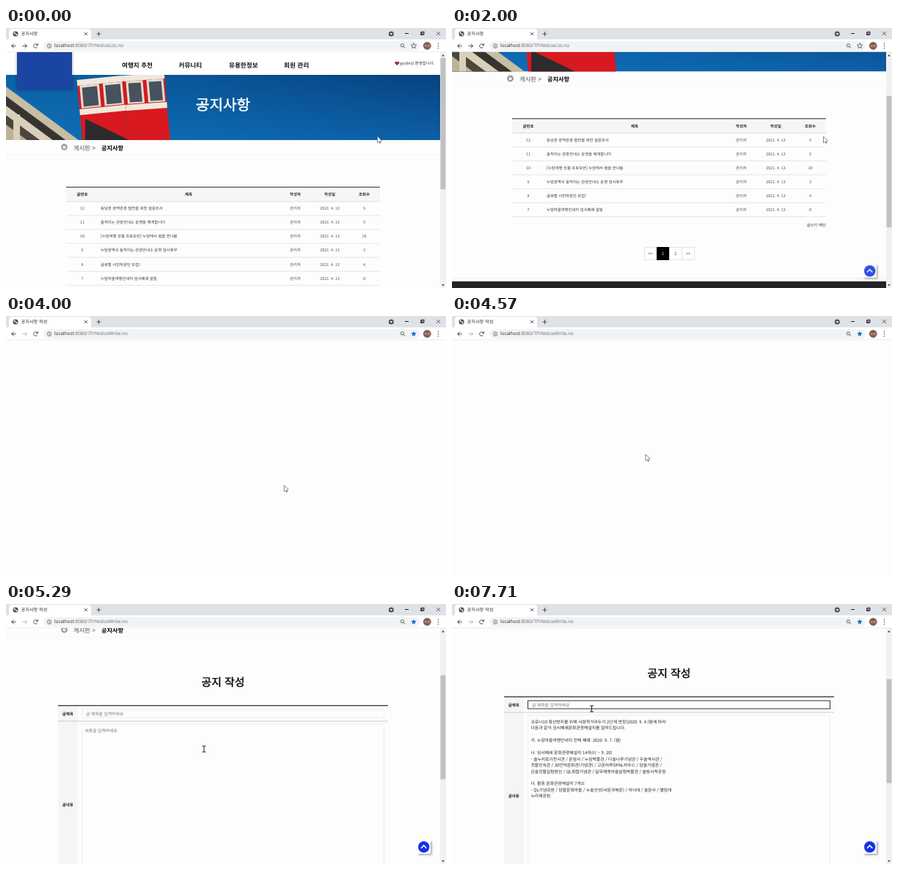
An HTML page with a canvas that plays this animation: 600x355 px, repeating every 8 s.

```html
<!DOCTYPE html>
<html lang="ko">
<head>
<meta charset="utf-8">
<title>공지사항</title>
<style>
html, body { margin: 0; width: 600px; height: 355px; overflow: hidden; background: #fdfdfd; }
canvas { display: block; }
</style>
</head>
<body>
<canvas id="stage" width="600" height="355"></canvas>
<script>
const ctx = document.getElementById('stage').getContext('2d');
const LOOP = 8000, FPS = 7, VIEW_TOP = 33, VIEW_H = 322;
const KR = '"Noto Sans CJK KR", "Noto Sans CJK", "Noto Sans", sans-serif';
const UI = '"Open Sans", "Noto Sans", sans-serif';
const INK = '#4d5156';

// ---------- helpers ----------
function rect(x, y, w, h, fill) { ctx.fillStyle = fill; ctx.fillRect(x, y, w, h); }
function box(x, y, w, h, color, width = 1) {
  ctx.strokeStyle = color; ctx.lineWidth = width;
  ctx.strokeRect(x + .5, y + .5, w - 1, h - 1);
}
function poly(points) {
  ctx.beginPath();
  for (let i = 0; i < points.length; i += 2) ctx.lineTo(points[i], points[i + 1]);
}
function shape(fill, ...points) { poly(points); ctx.closePath(); ctx.fillStyle = fill; ctx.fill(); }
function line(color, width, ...points) { poly(points); ctx.strokeStyle = color; ctx.lineWidth = width; ctx.stroke(); }
function disc(x, y, r, fill) { ctx.beginPath(); ctx.arc(x, y, r, 0, 7); ctx.fillStyle = fill; ctx.fill(); }
function ring(x, y, r, width, from = 0, to = 7) {
  ctx.beginPath(); ctx.arc(x, y, r, from, to);
  ctx.strokeStyle = INK; ctx.lineWidth = width; ctx.stroke();
}
function pill(x, y, w, h, r, fill) { ctx.beginPath(); ctx.roundRect(x, y, w, h, r); ctx.fillStyle = fill; ctx.fill(); }
function cross(x, y, r) { line(INK, .9, x - r, y - r, x + r, y + r); line(INK, .9, x + r, y - r, x - r, y + r); }
function chevron(x, y, r, color, width) { line(color, width, x - r, y + r / 2, x, y - r / 2, x + r, y + r / 2); }
function text(s, x, y, size, color = '#333', align = 'left', weight = 400, family = KR) {
  ctx.font = `${weight} ${size}px ${family}`;
  ctx.textRendering = 'geometricPrecision';
  ctx.textAlign = align; ctx.textBaseline = 'middle';
  ctx.fillStyle = color; ctx.fillText(s, x, y);
}
// Regular glyphs thickened a little, for medium-weight headings
function heading(s, x, y, size, color) {
  text(s, x, y, size, color, 'center');
  ctx.strokeStyle = color; ctx.lineWidth = size / 40; ctx.strokeText(s, x, y);
}
function scoped(fn) { ctx.save(); fn(); ctx.restore(); }
function shadow(blur, shift) { ctx.shadowColor = 'rgba(0,0,0,.4)'; ctx.shadowBlur = blur; ctx.shadowOffsetX = ctx.shadowOffsetY = shift; }
const clamp = v => Math.min(1, Math.max(0, v));
const ease = v => { v = clamp(v); return v * v * (3 - 2 * v); };

// ---------- browser frame ----------
function star(x, y, r, filled) {
  ctx.beginPath();
  for (let i = 0; i < 10; i++) {
    const a = (i / 5 - .5) * Math.PI, q = i % 2 ? r * .45 : r;
    ctx.lineTo(x + q * Math.cos(a), y + q * Math.sin(a));
  }
  ctx.closePath();
  ctx.fillStyle = '#1a67d2'; ctx.strokeStyle = INK; ctx.lineWidth = .8;
  filled ? ctx.fill() : ctx.stroke();
}
function arrow(x, dir, color) {
  line(color, 1, x - 3 * dir, 24.5, x + 3 * dir, 24.5);
  line(color, 1, x, 21.5, x + 3 * dir, 24.5, x, 27.5);
}
function chrome(writing) {
  rect(0, 0, 600, 16, '#dee1e6');
  pill(4, 1, 112, 20, 4, '#fff');
  rect(0, 15.5, 600, 17, '#fff');
  rect(0, 32.5, 600, .5, '#dcdee1');
  disc(13, 8, 3.6, INK);
  disc(11.8, 7, 1.2, '#dfe3e8'); disc(14.3, 9, 1.2, '#dfe3e8');
  text(writing ? '공지사항 작성' : '공지사항', 20.5, 8, 6.2, '#2c3034');
  cross(109, 8, 2);
  line(INK, 1, 123.5, 8, 129.5, 8); line(INK, 1, 126.5, 5, 126.5, 11);
  disc(525.3, 8, 3.5, INK);
  shape('#fff', 523.3, 7, 527.3, 7, 525.3, 9.4);
  line('#222', 1, 544, 7.5, 549, 7.5);
  box(566, 4.6, 4.6, 4.4, '#222', .8); box(565, 5.6, 4.6, 4.4, '#222', .8);
  cross(589.5, 7.5, 2.5);

  arrow(10.5, -1, INK);
  arrow(25.5, 1, writing ? '#b9bcc0' : INK);
  ring(40.3, 24.5, 2.7, 1, .5, 5.6);
  shape(INK, 43.8, 20.8, 43.8, 24, 40.6, 24);
  pill(51, 18, 513, 13, 6.5, '#f1f3f4');
  ring(59, 24.5, 2.8, .7);
  rect(58.6, 24, .9, 2.2, INK); rect(58.6, 22.6, .9, .8, INK);
  text('localhost', 66, 24.5, 6.4, '#202124', 'left', 400, UI);
  const w = ctx.measureText('localhost').width;
  text(`:8080/TP/Notice${writing ? 'Write' : 'List'}.no`, 66 + w, 24.5, 6.4, '#666a6f', 'left', 400, UI);
  ring(540.3, 23.7, 2.1, .9); line(INK, 1, 541.8, 25.2, 544.2, 27.6);
  star(556, 24.4, 3.9, writing);
  disc(574.3, 24.3, 5.4, '#8a5b50');
  text('누리', 574.3, 24.3, 4.2, '#f0e4e0', 'center');
  for (let i = -1; i < 2; i++) disc(589.5, 24.5 + i * 3, .8, INK);
}

// ---------- shared page parts ----------
function fade(x2, y2, from, to) {
  const g = ctx.createLinearGradient(0, 64, x2, y2);
  g.addColorStop(0, from); g.addColorStop(1, to);
  rect(0, 64, 592, 89, g);
}
// One leaning wall of the cable car: pale window band above a red body
function wall(x, y, w, slope, windows) {
  scoped(() => {
    ctx.transform(1, slope, .09, 1, x, y);
    rect(0, 0, w, 95, '#d8191f');
    rect(0, -4, w, 8, '#efe9dc');
    rect(0, 36, w, 8, '#efe9dc');
    const step = w / windows;
    for (let i = 0; i < windows; i++) {
      rect(i * step + 3, 4, step - 5, 31, '#e4ddd0');
      rect(i * step + 6, 7, step - 11, 26, '#46525c');
    }
  });
}
function hero() {
  scoped(() => {
    ctx.beginPath(); ctx.rect(0, 64, 592, 89); ctx.clip();
    fade(0, 153, '#07427f', '#0d5fa6');
    fade(592, 64, 'rgba(16,130,205,.5)', 'rgba(16,130,205,0)');
    ['#c8bda2', '#35342f', '#d9d0ba', '#4a463d', '#bdb298'].forEach((color, i) => {
      const y = 80 + i * 13;
      shape(color, 0, y, 160, y + 118, 0, y + 118);
    });
    rect(10, 118, 9, 35, '#d9d0ba');
    wall(97, 75, 63, -.1, 2);
    wall(160, 69, 56, -.07, 2);
    shape('#2d2b2c', 108, 124, 168, 153, 108, 153);
  });
  heading('공지사항', 296, 104.5, 20.2, '#fff');
}
function pageTop() {
  rect(0, 33, 592, 31, '#fff');
  Object.entries({ '여행지 추천': 158, '커뮤니티': 235.5, '유용한정보': 304, '회원 관리': 379 })
    .forEach(([s, x]) => text(s, x, 50.6, 8.6, '#111', 'left', 700));
  disc(531.9, 47.3, 1.6, '#8c3040'); disc(534.7, 47.3, 1.6, '#8c3040');
  shape('#8c3040', 530.4, 47.8, 536.2, 47.8, 533.3, 51.2);
  text('guide님 환영합니다.', 537, 48.3, 5.45, '#333');
  hero();
  scoped(() => { shadow(4, 0); rect(15, 33, 75, 51, '#1a45a2'); });
  disc(79.5, 162.5, 4.3, '#8f8f8f');
  rect(77.7, 162, 3.6, 2.8, '#fff');
  chevron(79.5, 161.2, 2.6, '#fff', 1);
  text('게시판 >', 92, 163.5, 8.3, '#8a8a8a', 'left', 700);
  text('공지사항', 130, 163.5, 8.2, '#000', 'left', 700);
  rect(0, 172, 592, 1, '#f5f5f5');
}
function scrollbar(scroll, pageHeight) {
  const rail = VIEW_H - 16, k = rail / pageHeight;
  rect(592, VIEW_TOP, 8, VIEW_H, '#f1f1f1');
  shape('#505050', 594, 38.5, 598, 38.5, 596, 36);
  shape('#505050', 594, 350, 598, 350, 596, 352.5);
  rect(592.5, 41 + scroll * k, 7, VIEW_H * k, '#c1c1c1');
}
function topButton(alpha) {
  if (!alpha) return;
  scoped(() => {
    ctx.globalAlpha = alpha;
    shadow(3, 1.5);
    rect(560, 322, 19, 19, '#fff');
    ctx.shadowColor = 'transparent';
    disc(569.7, 331.7, 7.7, '#1432e6');
    chevron(569.7, 331.6, 3.7, '#fff', 1.6);
  });
}

// ---------- notice list ----------
const NOTICES = {
  '동남권 광역관광 발전을 위한 설문조사': 9,
  '움직이는 관광안내소 운영을 재개합니다': 5,
  '[누담여행 상품 프로모션] 누담에서 쉼을 만나봄': 10,
  '누담광역시 움직이는 관광안내소 운영 임시휴무': 3,
  '글로벌 시민자문단 모집!': 4,
  '누담마을여행안내지 임시폐쇄 알림': 0
};
const COLUMNS = { '글번호': 104, '제목': 249, '작성자': 394.5, '작성일': 441.5, '조회수': 488.5 };
function listPage() {
  pageTop();
  rect(82, 217, 428, 20, '#f6f6f6');
  rect(82, 216.7, 428, 1.3, '#555');
  rect(82, 236.5, 428, 1, '#ddd');
  const cols = Object.values(COLUMNS);
  Object.keys(COLUMNS).forEach((s, i) => text(s, cols[i], 227.3, 5.4, '#222', 'center', 700));
  Object.entries(NOTICES).forEach(([title, views], i) => {
    const y = 246.3 + i * 19.05;
    [12 - i, '', '관리자', '2021. 4. 13', views].forEach((s, c) => text(s, cols[c], y, 5.4, '#555', 'center'));
    text(title, 129, y, 5.35, '#333');
    rect(82, y + 9.2, 428, 1, '#e6e6e6');
  });
  text('글쓰기 메인', 510, 362.6, 5.4, '#333', 'right');
  ['<<', '1', '2', '>>'].forEach((s, i) => {
    const x = 262 + i * 17.2, on = i === 1;
    rect(x, 392.6, 17.2, 18, on ? '#000' : '#fff');
    if (!on) box(x, 392.6, 17.2, 18, '#ddd', .8);
    text(s, x + 8.5, 401.8, 5.8, on ? '#fff' : '#444', 'center');
  });
  rect(0, 434.6, 592, 1, '#eee');
  rect(0, 439.6, 592, 40, '#222327');
}

// ---------- write form ----------
const BODY = `코로나19 확산방지를 위해 사회적거리두기 2단계 연장(2020. 9. 4.)됨에 따라
다음과 같이 임시폐쇄문화관광해설지를 알려드립니다.

가. 누담마을여행안내지 전체 폐쇄: 2020. 9. 7. (월)

나. 임시폐쇄 문화관광해설지 14개소( ~ 9. 20)
- 솔누리토기전시관 / 운담사 / 누담박물관 / 다솔나루기념관 / 두솔역사관 /
갯들민속관 / 30언덕문화관(기념관) / 고운마루OPAL하우스 / 담솔기념관 /
은솔강물길탐방선 / QL화합기념관 / 달무재옛마을살림박물관 / 솔빛사적공원

다. 활동 문화관광해설지 7개소
- QL기념공원 / 담들문화마을 / 누솔산성(서문과북문) / 하늬대 / 솔운사 / 별담대
누리재공원.`.split('\n');
function writePage(focus, filled) {
  pageTop();
  heading('공지 작성', 296, 234, 14.9, '#000');
  rect(71, 266, 27, 249, '#f5f5f5');
  rect(71, 265.5, 450, 1.4, '#444');
  for (const y of [287, 515]) rect(71, y, 450, 1, '#ccc');
  text('글제목', 84.3, 277, 5.4, '#222', 'center', 700);
  text('글내용', 84.3, 401.5, 5.4, '#222', 'center', 700);
  const edge = name => name === focus ? '#333' : '#ececec';
  box(103, 271, 413, 12, edge('title'));
  box(103, 291, 413, 220, edge('body'));
  text('글 제목을 입력하세요', 109, 277, 5.8, '#777');
  if (filled) BODY.forEach((s, i) => text(s, 107.5, 300.2 + i * 8.45, 5.8, '#222'));
  else text('내용을 입력하세요', 107.5, 300.5, 5.8, '#777');
}

// ---------- pointer ----------
function arrowPointer(x, y) {
  line('#666', 2, x + 2.5, y + 6, x + 4, y + 9.4);
  shape('#fff', x, y, x, y + 8.6, x + 6, y + 6);
  line('#666', .8, x + 2, y + 7.5, x, y + 8.6, x, y, x + 6, y + 6, x + 4, y + 6.6);
}
function textPointer(x, y) {
  line('#222', 1, x, y - 4, x, y + 4);
  for (const d of [-4, 4]) line('#222', 1, x - 2.5, y + d, x + 2.5, y + d);
}
const MOVES = [
  { at: 14, span: 7, x: 494.5, y: 273 },
  { at: 25, span: 6, x: 264, y: 189 },
  { at: 33, span: 3, x: 270, y: 198 },
  { at: 44, span: 4, x: 190.5, y: 143 }
];
function pointer(n) {
  let x = 506.5, y = 148;
  for (const m of MOVES) {
    const p = ease((n - m.at) / m.span);
    x += (m.x - x) * p; y += (m.y - y) * p;
  }
  (n >= 36 ? textPointer : arrowPointer)(x, y);
}

// ---------- timeline, n counts sevenths of a second ----------
function draw(n) {
  const writing = n >= 26, form = n >= 33, blank = n >= 28 && !form;
  const scroll = form ? 139.5 * ease((n - 36) / 1.22) : 93.6 * ease((n - 12) / 2);
  rect(0, 0, 600, 355, '#fdfdfd');
  if (!blank) {
    scoped(() => {
      ctx.translate(0, -scroll);
      if (form) writePage(n >= 46 ? 'title' : n >= 42 ? 'body' : '', n >= 44);
      else listPage();
    });
    scrollbar(scroll, form ? 694 : 550);
    topButton(form ? clamp(n - 36) : clamp((n - 12) * .43));
  }
  chrome(writing);
  pointer(n);
}
function tick() {
  const t = performance.now() % LOOP;
  draw(Math.floor((t + 5) * FPS / 1000) % (LOOP * FPS / 1000));
  requestAnimationFrame(tick);
}
tick();
</script>
</body>
</html>
```
